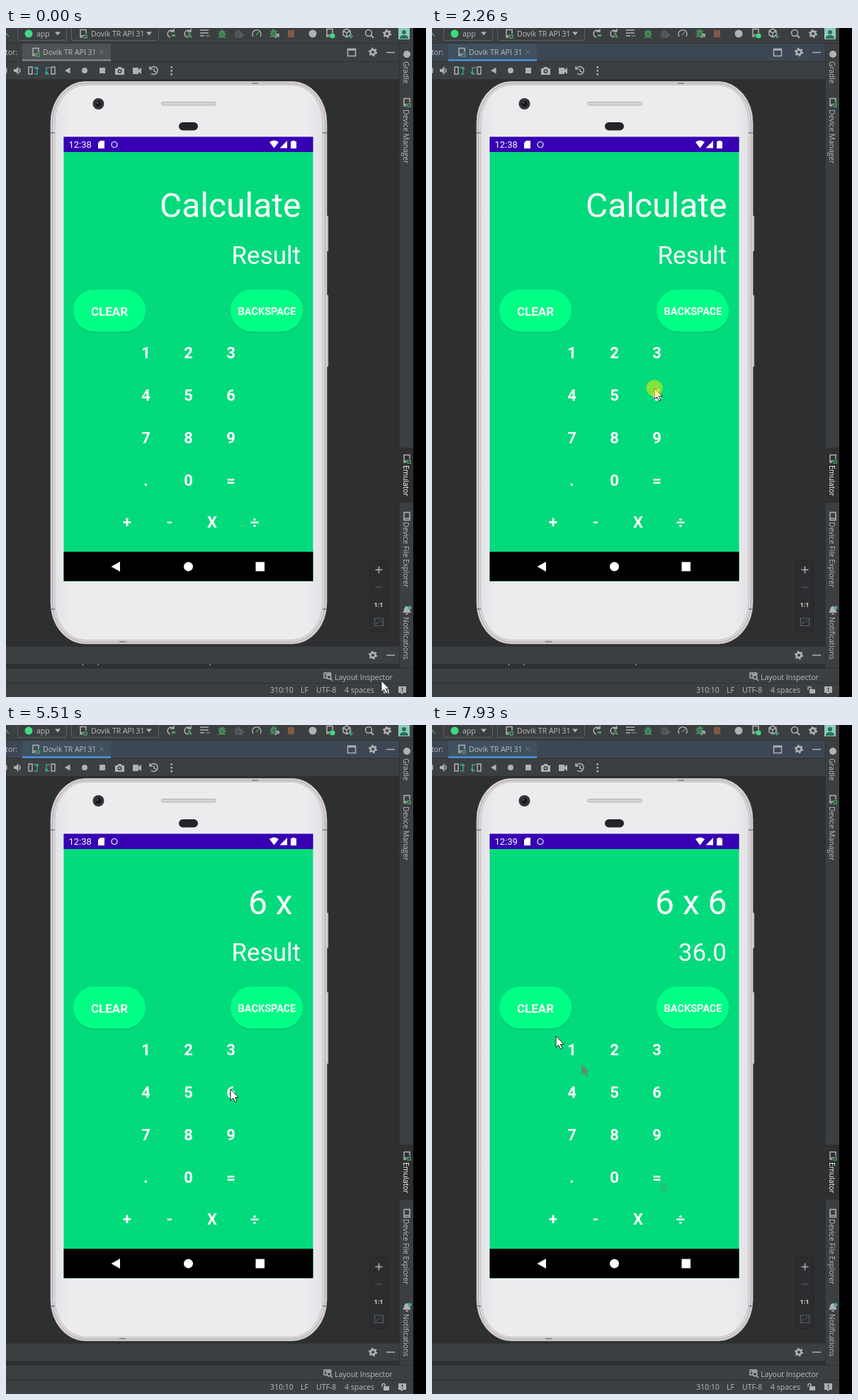
Write an HTML page that moves like this. It is 593 px wide and 944 px high and loops after 8000 ms.

```html
<!DOCTYPE html>
<html lang="en">
<head>
<meta charset="utf-8">
<title>Calculator in emulator</title>
<style>
html, body { margin: 0; width: 100%; height: 100%; overflow: hidden; background: #000; }
svg { display: block; width: 593px; height: 944px; }
text { white-space: pre; }
.ui { font: 10.5px "Open Sans", sans-serif; fill: #bbb; }
.side { font-size: 10.2px; }
.app { font-family: Roboto, sans-serif; fill: #fff; }
.key { font-size: 22px; font-weight: 700; text-anchor: middle; }
.icon { fill: none; stroke: #afb1b3; stroke-width: 1.5; }
.solid { fill: #afb1b3; stroke: none; }
.green { stroke: #4b9f63; }
.faded { stroke: #5d6063; }
.teal { stroke: #3a9d95; }
</style>
</head>
<body>
<svg viewBox="0 0 593 944">
  <defs>
    <g id="gear"><circle r="3.4" stroke-width="2.6"/><circle r="5.2" stroke-width="2" stroke-dasharray="2.3 3.145"/></g>
    <g id="phone"><path d="M-1 5H-4V-5.500H4V0M-4 3H0"/><path class="green" d="M1 2H5V6H1Z"/></g>
    <g id="bug"><ellipse cy="1" rx="2.800" ry="4"/><path d="M-6 1H6M-5-3L-2-1L2-1L5-3M-5 6L-2 3H2L5 6M-2-5L0-3L2-5" stroke-width="1.200"/></g>
    <path id="down" class="solid" d="M-4-2.500H4L0 2.500Z"/>
    <path id="cursor" d="M0 0V16L3.700 12.600L6.500 18.200L9 17L6.300 11.600H11.300Z"/>
    <linearGradient id="shell"><stop stop-color="#e4e4e8"/><stop offset=".06" stop-color="#ececef"/><stop offset=".94" stop-color="#ececef"/><stop offset="1" stop-color="#e2e2e6"/></linearGradient>
  </defs>

  <!-- IDE panels -->
  <path fill="#3c3f41" d="M0 0H575V944H0Z"/>
  <path fill="#2d2f31" d="M0 73H555V872H0ZM556 592H575V670H556ZM0 897H555V903H0Z"/>
  <path id="header" d="M0 22H555V46H0Z"/>
  <path id="tab" d="M23 22H148V46H23Z"/>
  <path id="underline" d="M23 44H148V47H23Z"/>
  <path stroke="#303234" fill="none" d="M0 21.500H575M0 47.500H555M0 72.500H555M555.500 22V903M0 872.500H555M0 903.500H575M0 924.500H575"/>
  <path id="ticks" stroke="#a5a5a5" d="M109 897L108 900M131 897L129.500 900M289 897L287.500 900"/>

  <!-- Run toolbar -->
  <g class="icon">
    <path class="green" d="M0 7L4 12"/>
    <path stroke="#5e6163" stroke-width="1" d="M16.500 0V15Q16.500 17.500 19 17.500H83Q85.500 17.500 85.500 15V0M92.500 0V15Q92.500 17.500 95 17.500H212Q215.500 17.500 215.500 15V0"/>
    <circle cx="32" cy="8" r="5.500" fill="#3ddc84" stroke="none"/>
    <use href="#down" x="73" y="8"/><use href="#down" x="202" y="8"/>
    <use href="#phone" x="109" y="8"/>
    <path d="M236 4A5 5 0 1 0 232 13M237 1V5H232M260 4A5 5 0 1 0 256 13M261 1V5H256M274 3H286M274 7H286M274 11H280"/>
    <path class="green" stroke-width="3" d="M234 10.500H239"/>
    <path class="green" d="M256 14L259 7L262 14M257 12H261M282 11H288"/>
    <use href="#bug" x="305" y="8" class="green"/>
    <use href="#bug" x="328" y="8" class="faded"/>
    <path class="faded" d="M331 7L336 10L331 13Z"/>
    <path d="M349 12A6 6 0 1 1 359 12"/><path class="green" d="M353 10L357 6"/>
    <use href="#bug" x="378" y="7" class="green"/><path d="M380 14L385 9M381 9H385V13"/>
    <path fill="#805a45" stroke="none" d="M398 3H407V13H398Z"/>
    <circle cx="433" cy="8" r="5.500" class="solid"/>
    <use href="#phone" x="457" y="7"/><circle cx="461" cy="11" r="3.500" fill="#3ddc84" stroke="none"/>
    <path d="M476 4L481 1L486 4V10L481 13L476 10ZM476 4L481 7L486 4M481 7V13"/><path class="teal" d="M487 7V14M484 11L487 14L490 11"/>
    <circle cx="512" cy="7" r="4.500"/><path stroke-width="2" d="M515 10L519 14"/>
    <use href="#gear" x="538" y="8"/>
    <path fill="#8fc9bb" stroke="none" d="M554 0H570V16H554Z"/>
    <path fill="#28705f" stroke="none" d="M562 3A3 3 0 0 1 562 9A3 3 0 0 1 562 3M556 15Q556 10 562 10T568 15Z"/>
  </g>
  <g class="ui">
    <text x="43" y="12">app</text><text x="120" y="12">Dovik TR API 31</text>
    <text x="-1" y="38">tor:</text><text x="52" y="38">Dovik TR API 31</text>
  </g>

  <!-- Emulator toolbar -->
  <g class="icon">
    <use href="#phone" x="42" y="34"/>
    <path stroke="#777" stroke-width="1" d="M132 31L138 37M138 31L132 37"/>
    <path d="M482.500 29.500H493.500V39.500H482.500ZM482 31H494M537 34.500H549M537 885H549"/>
    <use href="#gear" x="518" y="34"/><use href="#gear" x="518" y="885"/>
    <path d="M0 56Q2 60 0 64"/>
    <path class="solid" d="M11 58H14L17.500 54V66L14 62H11ZM90.500 55.500V64.500L83 60ZM132 56H140V64H132ZM154 57H157L158.500 55H162.500L164 57H167V66H154ZM179 56H187V59L191 56V65L187 62V65H179Z"/>
    <path d="M19 57Q21 60 19 63"/>
    <circle cx="111" cy="60" r="4" class="solid"/><circle cx="160.500" cy="61" r="2.200" stroke="#3c3f41"/>
    <path d="M32 55H37V65H32ZM64 55H69V65H64Z"/><path class="teal" d="M39 56H44V65H40M42 58L44 55L46 58M62 56H57V65H61M55 62L57 65L59 62"/>
    <path d="M204 57A5.500 5.500 0 1 1 205 64M203 54V58H207M209 57V61L212 62"/>
    <path class="solid" d="M232.500 54H235V56.500H232.500ZM232.500 59H235V61.500H232.500ZM232.500 64H235V66.500H232.500Z"/>
  </g>

  <!-- Tool window strip -->
  <g class="icon">
    <circle cx="566" cy="37" r="5" class="solid"/>
    <use href="#phone" x="566" y="105"/><use href="#phone" x="566" y="608"/>
    <path d="M562 683.500H570V694.500H562ZM562 692H570"/>
    <path class="solid" d="M560 825Q562 823 562 820Q563 816 566 816T570 820Q570 823 572 825ZM564 826H568V827.500H564Z"/>
    <circle cx="570" cy="818" r="2.600" fill="#43a9a0" stroke="none"/>
  </g>
  <g id="labels" class="ui side"></g>

  <!-- Status bar -->
  <g class="ui">
    <text x="464" y="919.500">Layout Inspector</text>
    <text x="373" y="938">310:10</text><text x="416" y="938">LF</text>
    <text x="438" y="938">UTF-8</text><text x="478" y="938">4 spaces</text>
  </g>
  <g class="icon" stroke-width="1.200">
    <path d="M454 917H449V910H458V912M452 914V912H460"/><circle cx="456" cy="916" r="2.800"/><path d="M458 918L461 921"/>
    <path d="M531 934V931Q531 929.500 533 929.500T535 931V934"/><path class="solid" d="M533 933H541V939H533ZM554 929H565V938H561L559 940L557 938H554Z"/>
    <path stroke="#3c3f41" d="M559.500 930.500V934M559.500 935V936.500"/>
  </g>

  <!-- Zoom panel -->
  <rect x="513.500" y="751.500" width="25" height="100" rx="3" fill="#2b2d2e" stroke="#242627"/>
  <g class="icon"><path d="M521.500 764.500H531.500M526.500 759.500V769.500"/><path class="faded" stroke-width="1.200" d="M521.500 789H531.500M520.500 833H532.500V843.500H520.500ZM523 841L525 838M530 835.500L528 838"/></g>
  <text class="ui" x="526" y="817" text-anchor="middle" style="font-size:9px;font-weight:700;fill:#ccc">1:1</text>

  <!-- Phone -->
  <path fill="#d8d1d3" stroke="#706a6c" stroke-width=".6" d="M451 265H455V315H451ZM451 377H455V478H451Z"/>
  <rect x="63" y="75.500" width="390" height="793.500" rx="49" ry="58" fill="#dcd6d9" stroke="#bdb7ba" stroke-width=".8"/>
  <rect x="65.500" y="78" width="385" height="788.500" rx="47" ry="56" fill="none" stroke="#9b9598" stroke-width=".8"/>
  <rect x="69" y="80.500" width="378" height="783" rx="44" ry="53" fill="url(#shell)" stroke="#bfbabd" stroke-width=".8"/>
  <path stroke="#77787c" stroke-width="1.500" d="M63 148H69M447 148H453M63 820H69M447 820H453M347 78H356M160 866H169"/>
  <circle cx="130.500" cy="107" r="8" fill="#343538"/><circle cx="130.500" cy="107" r="4" fill="#17181b"/><circle cx="129" cy="105.500" r="1.200" fill="#62666b"/>
  <rect x="219.500" y="104.500" width="77" height="4.500" rx="2.200" fill="#d3d2d4" stroke="#b4b2b5"/>
  <rect x="244" y="133" width="27" height="11.500" rx="5.700" fill="#242528"/>
  <path fill="#02da7c" d="M81.500 154H433.500V780.500H81.500Z"/>
  <path fill="#3700b3" d="M81.500 153.500H433.500V175H81.500Z"/>
  <path fill="#000" d="M81.500 739H433.500V780.500H81.500Z"/>
  <g fill="#fff">
    <path d="M133 159H139V170H130V162ZM372 161Q378.500 156 385 161L378.500 169.500ZM397 159V169.500H386.500ZM402 160H404V159H408V160H410V170H402ZM161 753V767L148.500 760ZM352.500 753.500H365V766.500H352.500Z"/>
    <circle cx="257.500" cy="760" r="6.500"/>
    <circle cx="153" cy="164.500" r="4" fill="none" stroke="#fff" stroke-width="1.200"/>
  </g>
  <g class="app">
    <text id="clock" x="88.500" y="169" font-size="13"></text>
    <text id="entry" x="416.500" y="266.500" font-size="48" text-anchor="end"></text>
    <text id="answer" x="416" y="333" font-size="35" text-anchor="end"></text>
    <g fill="#02b76a" opacity=".7"><rect x="95" y="371" width="102" height="59" rx="29.500"/><rect x="317" y="371" width="102" height="59" rx="29.500"/></g>
    <g fill="#00ff85"><rect x="95" y="369" width="102" height="59.500" rx="29.700"/><rect x="317" y="369" width="102" height="59.500" rx="29.700"/></g>
    <text class="key" x="146" y="406" style="font-size:17px">CLEAR</text>
    <text class="key" x="368.500" y="404.500" style="font-size:14.500px">BACKSPACE</text>
    <g id="keys"></g>
  </g>

  <g id="trail" fill="#5b8f72"><use href="#cursor" x="211" y="478"/><use href="#cursor" x="323" y="643" opacity=".35"/></g>
  <use id="pointer" href="#cursor" fill="#fff" stroke="#222" stroke-width="1"/>
  <circle id="tap" r="11.500" fill="#ffec00" opacity=".5"/>
</svg>
<script>
const $ = id => document.getElementById(id);

const rows = ["123", "456", "789", ".0="];
const key = (x, y, label) => `<text class="key" x="${x}" y="${y}">${label}</text>`;
$("keys").innerHTML =
  rows.map((row, r) => [...row].map((k, c) => key(197.5 + c * 60, 466 + r * 60, k)).join("")).join("") +
  [..."+-X÷"].map((k, c) => key(171 + c * 60, 705, k)).join("");

$("labels").innerHTML = [
  ["Gradle", 47], ["Device Manager", 115], ["Emulator", 617, "#fff"],
  ["Device File Explorer", 697], ["Notifications", 831]
].map(([label, y, color = "#bbb"]) =>
  `<text transform="translate(561 ${y}) rotate(90)" fill="${color}">${label}</text>`).join("");

// Pointer moves: start, end, target x, y and optional bend point
const moves = [
  [70, 190, 482, 857], [660, 1180, 416, 839], [1450, 2190, 314, 508, 395, 650],
  [2520, 2990, 316, 564], [4170, 4830, 292, 692], [5040, 5510, 317, 514],
  [6190, 6650, 325, 643, 365, 585], [7530, 7930, 175, 439]
];
const taps = [[2190, 2320], [4830, 5040], [5780, 5910], [6790, 7000]];
const entries = [[0, "Calculate"], [3300, "6"], [4930, "6 x "], [5840, "6 x 6"]];
const answers = [[0, "Result"], [6930, "36.0"]];
const clocks = [[0, "12:38"], [6860, "12:39"]];

const valueAt = (steps, t) => steps.filter(([start]) => start <= t).pop()[1];
const bezier = (a, b, c, p) => (1 - p) ** 2 * a + 2 * p * (1 - p) * b + p * p * c;

function pointerAt(t) {
  let x = 530, y = 921;
  for (const [start, end, toX, toY, bendX = (x + toX) / 2, bendY = (y + toY) / 2] of moves) {
    if (t < start) break;
    const p = Math.min(1, (t - start) / (end - start));
    // Short flicks keep a constant speed
    const s = end - start < 450 ? p : p * p * (3 - 2 * p);
    x = bezier(x, bendX, toX, s);
    y = bezier(y, bendY, toY, s);
  }
  return [x, y];
}

function draw(now) {
  const t = now % 8000;
  const at = `translate(${pointerAt(t).map(Math.round)})`;
  const focused = t >= 2260;
  $("pointer").setAttribute("transform", at);
  $("tap").setAttribute("transform", at);
  $("tap").style.display = taps.some(([on, off]) => t >= on && t < off) ? "" : "none";
  $("trail").style.display = t >= 7930 ? "" : "none";
  $("ticks").style.display = t < 3430 ? "" : "none";
  $("header").style.fill = focused ? "#3d4754" : "#3c3f41";
  $("tab").style.fill = focused ? "#40505f" : "#4e5254";
  $("underline").style.fill = focused ? "#4a88c7" : "#747a80";
  $("entry").textContent = valueAt(entries, t);
  $("answer").textContent = valueAt(answers, t);
  $("clock").textContent = valueAt(clocks, t);
  requestAnimationFrame(draw);
}
requestAnimationFrame(draw);
</script>
</body>
</html>
```
